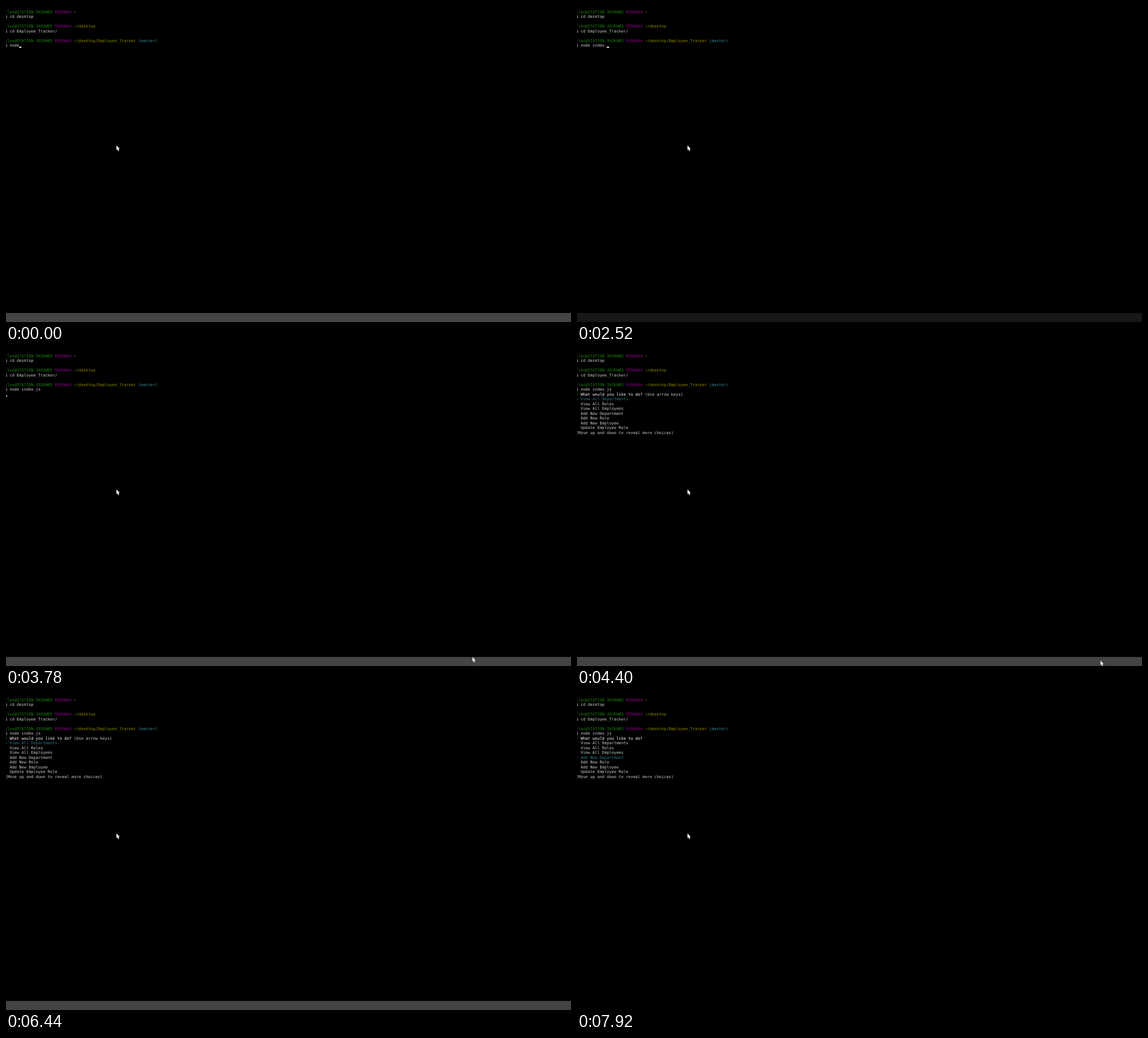
Animation, 1000 px wide and 560 px high, one loop 8 s. Source, as an HTML page:

```html
<!DOCTYPE html>
<html lang="en">
<head>
<meta charset="utf-8">
<title>Terminal session</title>
<style>
  :root { --w: 4.214px; --row: 8.44px; --top: 7.2px; --loop: 8s; }
  html, body { margin: 0; width: 100%; height: 100%; overflow: hidden; background: #000; }
  .stage { position: relative; width: 1000px; height: 560px; overflow: hidden; background: #000; isolation: isolate; }
  .stage > * { position: absolute; }
  /* The tiny rotation keeps baselines from snapping to whole pixels. */
  .term, .menu, .mark {
    left: -2px; margin: 0; white-space: pre; color: #cecece;
    font: 7px/var(--row) "DejaVu Sans Mono", monospace;
    text-rendering: geometricPrecision;
    rotate: .01deg; transform-origin: 0 0;
  }
  .term { top: var(--top); }
  .menu, .mark, .pick { top: calc(var(--top) + 8 * var(--row)); }
  .user { color: #1c7e0a; }
  .sys { color: #88008a; }
  .path { color: #8e8e00; }
  .branch { color: #3f8797; }
  .ask { color: #fff; }

  /* The black cover hides everything not typed yet. */
  .caret { left: -2px; top: calc(var(--top) + 7 * var(--row)); width: 70px; height: var(--row); background: #000; animation: type var(--loop) step-end infinite; }
  .caret::after { content: ""; position: absolute; left: 0; top: 5.5px; width: 4.4px; height: 2px; background: #f2f2f2; }
  @keyframes type {
    0% { transform: translateX(calc(6 * var(--w))); }
    7.5% { transform: translateX(calc(7 * var(--w))); }
    16.625% { transform: translateX(calc(8 * var(--w))); }
    18.625% { transform: translateX(calc(9 * var(--w))); }
    27.25% { transform: translateX(calc(10 * var(--w))); }
    28.25% { transform: translateX(calc(11 * var(--w))); }
    30.25% { transform: translateX(calc(12 * var(--w))); }
    31.5% { transform: translateX(calc(13 * var(--w))); }
    33.375% { transform: translateX(calc(14 * var(--w))); }
    36.125% { transform: translateX(calc(15 * var(--w))); }
    39.25% { transform: translateY(var(--row)); opacity: 1; }
    51.25%, 100% { transform: translateY(var(--row)); opacity: 0; }
  }

  .menu, .mark, .pick { animation: show var(--loop) step-end infinite; }
  .mark, .pick { animation-name: show, choose; }
  .mark { color: #2b8592; }
  .pick { left: 0; width: 190px; height: var(--row); background: #3597a6; mix-blend-mode: multiply; }
  .hint { animation: hint var(--loop) step-end infinite; }
  @keyframes show { 0% { opacity: 0; } 51.25%, 100% { opacity: 1; } }
  @keyframes hint { 0% { opacity: 1; } 82.375%, 100% { opacity: 0; } }
  @keyframes choose {
    0% { transform: translateY(var(--row)); }
    82.375% { transform: translateY(calc(2 * var(--row))); }
    85.25% { transform: translateY(calc(3 * var(--row))); }
    88.125%, 100% { transform: translateY(calc(4 * var(--row))); }
  }

  .bar { left: 0; top: 543px; width: 1000px; height: 17px; clip-path: inset(.5px 0 0); background: #444; animation: dim var(--loop) linear infinite; }
  @keyframes dim {
    0%, 17% { background: #444645; }
    31.5% { background: #171717; }
    33.37% { background: #121212; }
    33.38%, 81.25% { background: #444; }
    98.5%, 100% { background: #000; }
  }

  .mouse { left: 0; top: 0; width: 8px; height: 12px; overflow: visible; fill: #fff; stroke: #111; stroke-width: .8; paint-order: stroke; }
  .still { transform: translate(195.3px, 247px); }
  .guest { animation: visit var(--loop) linear infinite; }
  @keyframes visit {
    0%, 46.12% { transform: translate(810px, 542px); opacity: 0; }
    46.13% { transform: translate(810px, 542px); opacity: 1; }
    47.25%, 48.1% { transform: translate(825.3px, 543.8px); }
    55% { transform: translate(926.2px, 550px); }
    58.1%, 59.12% { transform: translate(950px, 550.4px); opacity: 1; }
    59.13%, 100% { transform: translate(950px, 550.4px); opacity: 0; }
  }
</style>
</head>
<body>
<div class="stage">
<pre class="term"><span class="user">cleo@STATION-302KWB5</span> <span class="sys">MINGW64</span> <span class="path">~</span>
$ cd desktop

<span class="user">cleo@STATION-302KWB5</span> <span class="sys">MINGW64</span> <span class="path">~/desktop</span>
$ cd Employee_Tracker/

<span class="user">cleo@STATION-302KWB5</span> <span class="sys">MINGW64</span> <span class="path">~/desktop/Employee_Tracker</span> <span class="branch">(master)</span>
$ node index.js</pre>
<div class="caret"></div>
<pre class="menu"><span class="user">?</span> <span class="ask">What would you like to do?</span> <span class="hint">(Use arrow keys)</span>
  View All Departments
  View All Roles
  View All Employees
  Add New Department
  Add New Role
  Add New Employee
  Update Employee Role
(Move up and down to reveal more choices)</pre>
<div class="pick"></div>
<div class="mark">&gt;</div>
<div class="bar"></div>
<svg class="mouse still"><path id="arrow" d="M.3 0V8.6L2.1 7 3.4 10.2 4.9 9.6 3.6 6.5H6Z"/></svg>
<svg class="mouse guest"><use href="#arrow"/></svg>
</div>
</body>
</html>
```
